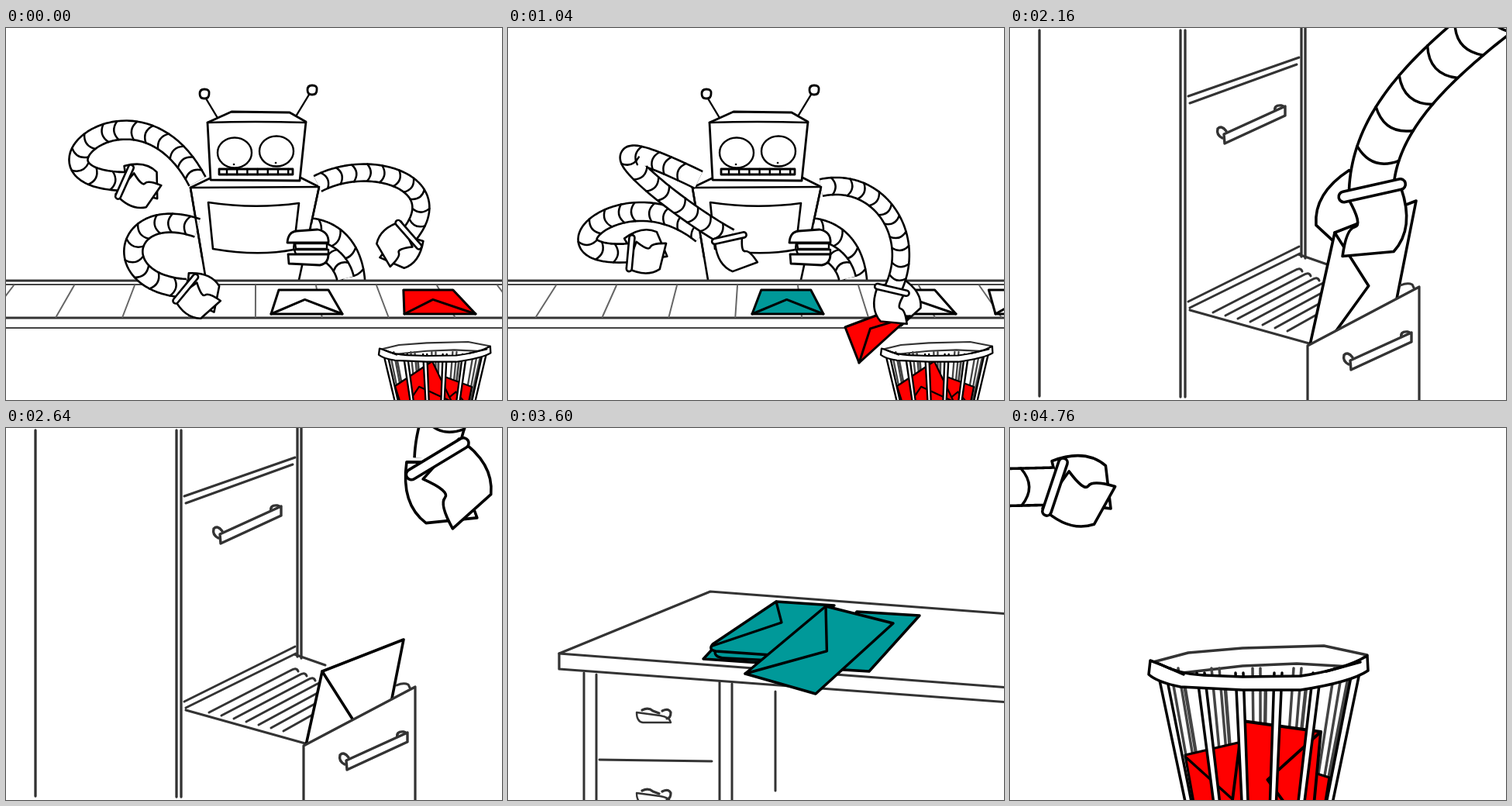
These frames come from a looping animation (640x480 px, 4840 ms). An HTML page with a canvas:

```html
<!DOCTYPE html>
<html lang="en">
<head>
<meta charset="utf-8">
<title>Mail sorting robot</title>
<style>
html, body { margin: 0; width: 100%; height: 100%; overflow: hidden; background: #fff; }
canvas { display: block; width: 640px; height: 480px; }
</style>
</head>
<body>
<canvas id="stage" width="640" height="480"></canvas>
<script>
const ctx = document.getElementById('stage').getContext('2d');
const RED = '#f00', TEAL = '#099', WHITE = '#fff', GREY = '#333', PALE = '#666';
const LOOP = 4840, BELT_SPEED = 13 / 40;
ctx.lineJoin = 'round';

// ---- drawing helpers ----
function ink(d, w = 2.6, fill = null, color = '#000') {
  const p = new Path2D(d);
  if (fill) { ctx.fillStyle = fill; ctx.fill(p); }
  ctx.lineWidth = w;
  ctx.strokeStyle = color;
  ctx.lineCap = 'round';
  ctx.stroke(p);
}

function within(x, y, sx, sy, angle, draw) {
  ctx.save();
  ctx.translate(x, y);
  ctx.rotate(angle);
  ctx.scale(sx, sy);
  draw();
  ctx.restore();
}

const mix = (a, b, u) => a.map((v, i) => v + (b[i] - v) * u);

// Blend between [time, values] pairs with a smooth ease.
function key(t, ...ks) {
  if (t <= ks[0][0]) return ks[0][1];
  const i = ks.findIndex(k => t < k[0]);
  if (i < 0) return ks[ks.length - 1][1];
  const [t0, a] = ks[i - 1], [t1, b] = ks[i], u = (t - t0) / (t1 - t0);
  return mix(a, b, u * u * (3 - 2 * u));
}

const shift = (q, dx, dy) => q.map((v, i) => i > 7 ? v : v + (i % 2 ? dy : dx));
const opened = pose => [...pose.slice(0, -1), 1];

// Envelope from four corners; the flap hangs on the third side.
function envelope(q, color, w = 3, flap = true) {
  const [ax, ay, bx, by, cx, cy, dx, dy] = q;
  const [vx, vy] = mix([(cx + dx) / 2, (cy + dy) / 2], [(ax + bx) / 2, (ay + by) / 2], 0.6);
  ink(`M${ax} ${ay}L${bx} ${by}L${cx} ${cy}L${dx} ${dy}Z`, w, color);
  if (flap) ink(`M${cx} ${cy}L${vx} ${vy}L${dx} ${dy}`, w);
}

// Ribbed hose on a cubic curve; "tail" runs its root straight on, off stage.
function tube([x0, y0, x1, y1, x2, y2, x3, y3], w, lw, tail = 0) {
  const pts = [], h = w / 2, gap = w * 0.85;
  const len = Math.hypot(x1 - x0, y1 - y0), ux = (x0 - x1) / len, uy = (y0 - y1) / len;
  for (let d = tail; d > 0; d -= 6) pts.push([x0 + ux * d, y0 + uy * d]);
  for (let i = 0; i <= 48; i++) {
    const u = i / 48, v = 1 - u;
    const at = (a, b, c, d) => v * v * v * a + 3 * v * v * u * b + 3 * v * u * u * c + u * u * u * d;
    pts.push([at(x0, x1, x2, x3), at(y0, y1, y2, y3)]);
  }
  ctx.lineCap = 'butt';
  for (const [width, color] of [[w + lw, '#000'], [w - lw, WHITE]]) {
    ctx.beginPath();
    pts.forEach(p => ctx.lineTo(...p));
    ctx.lineWidth = width;
    ctx.strokeStyle = color;
    ctx.stroke();
  }
  let run = -gap * 0.1;
  for (let i = pts.length - 1; i > 0; i--) {
    const [px, py] = pts[i - 1], [x, y] = pts[i];
    const d = Math.hypot(x - px, y - py), tx = (x - px) / d * h, ty = (y - py) / d * h;
    run += d;
    if (run < gap) continue;
    run -= gap;
    ink(`M${x - ty} ${y + tx}Q${x + tx * .85} ${y + ty * .85} ${x + ty} ${y - tx}`, lw * 0.95);
  }
}

// Pose: four curve points, then the aim of the claw and how far it is open.
function arm(pose, w, { lw = 2.6, size = w / 46, flip = 1, tail = 0, held = null } = {}) {
  const [x, y, aim, open] = pose.slice(6);
  const line = lw / size;
  const plate = (turn, side) => within(x, y, size, size * flip, aim * 1, () => {
    ctx.rotate(turn);
    ctx.scale(1, side);
    ink('M4 31Q48 36 67 9L60 -44Q33 -34 33 -25T3 -25Z', line, WHITE);
  });
  if (held || open > 0.2) plate(0.85 * open - 1.1, -1);
  if (held) held();
  tube(pose, w, lw, tail);
  plate(0.64 * open, 1);
  const lean = 10 * open;
  within(x, y, size, size * flip, aim, () => {
    ink(`M${lean} -29L${-lean} 31`, 11 + line);
    ink(`M${lean} -29L${-lean} 31`, 11 - line, null, WHITE);
  });
}

// Waste basket; contents are painted between its back and front.
function basketAt(x, y, sx, sy, lw, contents) {
  const bar = (c, from, half, fill, color) => {
    const foot = 322 + (c - 322) * 0.73;
    ink(`M${c - half} ${from}L${foot - half * .8} 482H${foot + half * .8}L${c + half} ${from}`, lw, fill, color);
  };
  const local = draw => within(x, y, sx, sy, 0, () => { ctx.translate(-179, -281); draw(); });
  local(() => {
    ink('M181 303L230 290L300 284L405 281L461 293L440 308L370 304L300 307L222 316Z', lw, WHITE, GREY);
    for (let c = 212; c < 440; c += 53) {
      bar(c, 310, 5, null, '#444');
      bar(c + 12, 325, 0.5, null, '#444');
    }
  });
  contents();
  local(() => {
    for (let i = 0; i < 6; i++) bar(196 + i * 50, 316, 5, WHITE, '#000');
    ink('M181 300L194 305Q220 318 250 319L300 321L375 320Q430 312 461 294L462 313Q440 328 375 338L300 338L220 334Q190 328 179 318Z', lw, WHITE);
    ink('M194 305L224 318M408 314L452 302', lw);
  });
}

// ---- sorting line ----
const UPPER = {
  rest: [247, 198, 170, 50, 5, 195, 153, 198, .1, 1],
  reach: [246, 196, 60, 105, 210, 230, 286, 271, 1.35, 0],
  grab: [246, 196, 70, 110, 240, 215, 302, 310, 1.35, 0],
  lift: [246, 202, 130, 40, 150, 310, 118, 174, -1.05, 0]
};
const LOWER = {
  work: [247, 258, 150, 225, 130, 330, 232, 336, .4, .9],
  rest: [250, 266, 150, 185, 30, 300, 158, 290, -.2, .9]
};
const RIGHT = {
  rest: [402, 201, 470, 165, 575, 200, 520, 267, 2.1, 1],
  grab: [404, 203, 460, 190, 515, 255, 476, 325, 1.9, 0],
  carry: [404, 206, 480, 190, 530, 270, 496, 338, 1.8, 0],
  drop: [404, 203, 480, 185, 555, 220, 545, 325, 1.6, 0]
};
const MIDDLE = {
  rest: [438, 323, 434, 305, 420, 290, 402, 286, 2.9, 0],
  grab: [440, 322, 405, 312, 385, 312, 360, 326, 2.6, 0]
};
const RED_HELD = [435, 386, 475, 371, 519, 372, 453, 432];
const RED_BINNED = [520, 460, 562, 431, 606, 463, 560, 500];
const TEAL_HELD = [133, 88, 147, 122, 108, 177, 70, 177];

function onBelt(start, t) {
  const x = start - BELT_SPEED * t, top = x - 4 - (x - 388) * .065;
  return [top - 32, 338, top + 32, 338, x + 46, 369, x - 46, 369];
}

function body() {
  ink('M258 325L238 206L263 194L380 193L404 205L378 325', 2.6, WHITE);
  ink('M238 206L404 205');
  ink('M261 225Q320 234 378 226L371 286Q325 295 267 285Z');
}

function head() {
  ink('M273 116L258 91M374 114L391 86', 2.4);
  for (const [x, y] of [[256, 85], [395, 80]])
    ink(`M${x - 6} ${y}q0 -6 6 -6q7 0 6 6q0 6 -6 6q-6 0 -6 -6Z`, 2.8, WHITE);
  ink('M260 122L291 108L366 109L387 121L379 197L264 196Z', 2.8, WHITE);
  ink('M260 122Q320 120 387 122');
  for (const [x, y] of [[295, 161], [349, 159]]) {
    ink(`M${x - 22} ${y}a22 19.5 0 1 1 44 0a22 19.5 0 1 1 -44 0Z`, 2.4, WHITE);
    ink(`M${x - 1} ${y + 15}h.1`);
  }
  ink('M275 182H370V189H275Z', 2.8, WHITE);
  for (let x = 285; x < 370; x += 13.2) ink(`M${x} 182V189`, 2.4);
}

function belt(t) {
  ctx.fillStyle = WHITE;
  ctx.fillRect(0, 326, 640, 61);
  ink('M0 326H640M0 374H640', 2.8, null, GREY);
  ink('M0 331H640M0 387H640', 2.2, null, '#444');
  for (let x = 10 - BELT_SPEED * t % 78; x < 720; x += 78)
    ink(`M${x} 332L${323 + (x - 323) * 1.1} 373`, 2, null, PALE);
}

function fist() {
  ink('M363 277Q364 263 375 262L402 260Q417 263 416 277Z', 2.8, WHITE);
  ink('M373 278H414V285H374ZM372 286H416V292H374Z', 2.4, WHITE);
  ink('M364 292H416Q416 304 405 306L365 304Z', 2.8, WHITE);
}

function sorting(t) {
  const picked = onBelt(388, 360);
  const white = key(t, [360, picked], [560, shift(picked, -82, -48)], [720, shift(picked, -82, 20)]);
  const red = key(t, [320, onBelt(560, 320)], [1040, RED_HELD], [1160, shift(RED_HELD, 55, -14)],
    [1280, RED_BINNED]);
  const teal = key(t, [1200, onBelt(699, 1200)], [1640, TEAL_HELD]);
  const size = 0.64;

  body();
  head();
  tube([394, 260, 430, 265, 450, 295, 449, 340], 29, 2.6);
  if (t >= 560 && t < 720) envelope(white, WHITE);
  belt(t);
  for (const [x, color, until] of [[388, WHITE, 360], [560, RED, 320], [699, TEAL, 1200],
    [870, WHITE, LOOP], [1013, WHITE, LOOP], [1157, RED, LOOP]])
    if (t < until) envelope(onBelt(x, t), color);

  arm(key(t, [320, LOWER.work], [600, LOWER.rest]), 24,
    { size, held: t >= 360 && t < 560 && (() => envelope(white, WHITE)) });
  arm(key(t, [40, RIGHT.rest], [320, RIGHT.grab], [1040, RIGHT.carry], [1160, RIGHT.drop],
    [1240, opened(RIGHT.drop)], [1560, RIGHT.rest]), 22,
    { size, held: t >= 320 && t < 1160 && (() => envelope(red, RED)) });
  ink('M238 206L253 296M404 205L394 252');
  arm(key(t, [600, UPPER.rest], [1040, UPPER.reach], [1200, UPPER.grab], [1640, UPPER.lift]), 24,
    { size, held: t >= 1200 && (() => envelope(teal, TEAL, 3, false)) });
  if (t < 1400) {
    tube(MIDDLE.rest, 22, 2.6);
    fist();
  } else arm(key(t, [1360, MIDDLE.rest], [1640, MIDDLE.grab]), 21, { size });

  basketAt(481, 405, .51, .45, 4.6, () => {
    envelope([566, 450, 601, 463, 596, 488, 556, 490], RED, 2.2);
    envelope([502, 462, 550, 430, 575, 482, 512, 494], RED, 2.2);
    if (t >= 1160) envelope(red, RED, 2.2);
  });
}

// ---- filing cabinet ----
const FILING = [670, -48, 560, 35, 470, 110, 466, 210, 1.35, 0];
const LETTER = [487, 410, 524, 223, 419, 264, 378, 450];

function handle(x, y) {
  within(x, y, 1, 1, 0, () => {
    ink('M-2 5Q-10 1 -8 -7Q-3 -12 3 -4M66 -29Q64 -38 74 -37Q79 -36 78 -31', 3.4, null, GREY);
    ink('M0 0L79 -36V-24L1 12Z', 3.4, WHITE, GREY);
  });
}

function cabinet(t) {
  ink('M38 3V475M220 3V476M226 3V476M376 0V295M381 0V297', 3.3, null, GREY);
  ink('M230 88L373 38M232 97L370 47M230 353L373 282M232 361L374 291M372 292L412 306M232 364L386 407', 3, null, GREY);
  handle(276, 137);
  for (let i = 0; i < 7; i++)
    ink(`M${262 + i * 16} ${367 + i * 4}l${105 - i * 5} ${i * 2 - 54}q8 -5 10 1`, 3, null, GREY);

  const low = shift(FILING, -11, 50);
  const pose = key(t, [1760, shift(FILING, 170, -330)], [2160, FILING], [2400, low],
    [2480, opened(low)], [2800, shift(opened(FILING), 190, -390)]);
  const letter = () => envelope(
    key(t, [1760, shift(LETTER, 170, -330)], [2160, LETTER], [2400, shift(LETTER, -11, 50)]), WHITE, 3.6);
  const held = t < 2480;
  ctx.save();
  ctx.clip(new Path2D('M0 0H640V334H528L384 410H0Z'));
  if (!held) letter();
  arm(pose, 57, { lw: 3.6, flip: -1, tail: 420, held: held && letter });
  ctx.restore();

  ink('M504 332Q513 328 519 331L522 337', 3, null, GREY);
  ink('M384 500V410L528 334V500Z', 3.2, WHITE, GREY);
  handle(439, 429);
}

// ---- desk ----
const STACKING = [-20, 380, 100, 410, 250, 440, 340, 351, -1.13, 0];
const STACKED = [497, 252, 397, 343, 306, 317, 410, 230];

function pull(x, y) {
  within(x, y, 1, 1, 0, () => {
    ink('M0 0L30 4Q43 6 44 13H8Q0 12 0 0Z', 2.4, WHITE, GREY);
    ink('M7 -3q8 -4 14 1l8 3M33 -2q8 -4 11 2q0 7 -5 8', 3.2, null, GREY);
  });
}

function desk(t) {
  ink('M98 316V480M114 318V480M273 328V480M289 330V480M345 340V468M118 428L263 430', 3, null, GREY);
  pull(166, 367);
  pull(166, 471);
  ink('M66 291L261 211L660 241V355L66 311Z', 3.2, WHITE, GREY);
  ink('M66 291L660 336', 3, null, GREY);
  ink('M450 237L531 242L466 314L400 310Z', 3.4, TEAL);
  ink('M265 284L252 298L340 304L400 250Z', 3.4, TEAL);
  ink('M268 286Q264 296 280 297L340 300L380 270Z', 3.4, TEAL);
  ink('M346 224L421 229L340 293L268 288Q258 286 264 279Z', 3.4, TEAL);
  ink('M346 224L353 251L264 281', 3.2);

  const pose = key(t, [2880, shift(STACKING, -360, 55)], [3120, STACKING], [3200, STACKING],
    [3280, opened(STACKING)], [3600, shift(opened(STACKING), -450, 70)]);
  const letter = () => envelope(key(t, [2880, shift(STACKED, -360, 55)], [3120, STACKED]), TEAL, 3.4);
  const held = t < 3200;
  if (!held) letter();
  arm(pose, 40, { lw: 3.4, flip: -1, tail: 420, held: held && letter });
}

// ---- waste basket close-up ----
const TOSS = {
  hold: [-15, 85, 50, 55, 130, 40, 187, 101, 1.47, 0],
  low: [-15, 100, 70, 70, 170, 90, 240, 186, .9, 1],
  away: [-60, 77, -20, 77, 20, 76, 58, 75, 0, 1]
};
const TOSSED = [223, 277, 146, 139, 265, 130, 337, 273];
const BINNED = [282, 520, 300, 378, 401, 392, 388, 530];

function basket(t) {
  const held = t < 4280;
  const q = key(t, [3720, shift(TOSSED, -340, -30)], [4040, TOSSED],
    [4280, shift(TOSSED, 55, 70)], [4440, BINNED]);
  const pose = key(t, [3720, shift(TOSS.hold, -340, -30)], [4040, TOSS.hold],
    [4280, shift(TOSS.hold, 55, 70)], [4520, TOSS.low], [4760, TOSS.away]);
  const letter = () => envelope(q, RED, 3.8);
  const reach = () => arm(pose, 48, { lw: 3.6, tail: 260, held: held && letter });
  basketAt(179, 281, 1, 1, 3.5, () => {
    envelope([345, 430, 412, 451, 404, 500, 335, 500], RED, 3.2);
    ink('M226 422L320 400L345 500H240ZM226 424L286 478', 3.2, RED);
    held ? reach() : letter();
  });
  if (!held) reach();
}

// Each scene: start, frame step, painter, start of its last drawing.
const SCENES = [
  [0, 40, sorting, 1720],
  [1760, 80, cabinet, 2800],
  [2880, 80, desk, 3600],
  [3720, 80, basket, 4760]];

function frame() {
  const t = (performance.now() - begin) % LOOP;
  const [start, step, paint, last] = SCENES.filter(s => s[0] <= t).pop();
  ctx.fillStyle = WHITE;
  ctx.fillRect(0, 0, 640, 480);
  paint(Math.min(last, start + Math.floor((t - start) / step) * step));
  requestAnimationFrame(frame);
}
const begin = performance.now();
frame();
</script>
</body>
</html>
```
